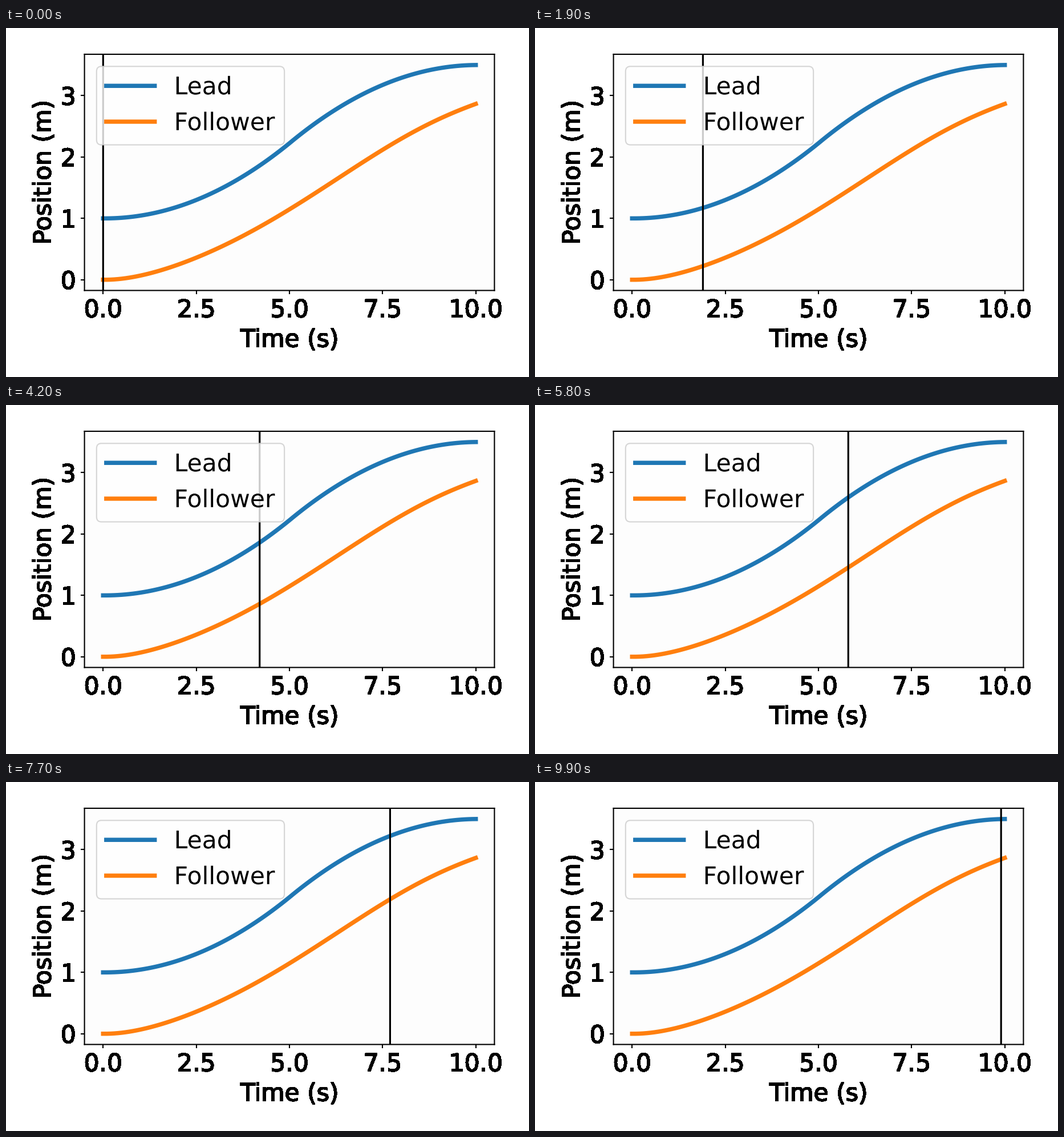
Recreate the animation shown at these times as a matplotlib script. Size 917 px wide and 611 px high, loop 10000 ms.

```python
import numpy as np
import matplotlib.pyplot as plt
from matplotlib import patheffects
from matplotlib.animation import FuncAnimation

W, H = 917, 611
DPI = W / 6
FRAMES, INTERVAL = 100, 100
LEFT, RIGHT, TOP, BOTTOM = 137.6, 856.4, 46.0, 459.5
DT = 0.1

plt.rcParams.update({
    "font.family": "DejaVu Sans",
    "font.size": 20,
    "path.snap": False,
    "text.hinting": "none",
    "axes.linewidth": 1,
    "xtick.major.width": 1,
    "ytick.major.width": 1,
})


def lead(t):
    """Stepwise integrated: 5 s of constant acceleration, then braking."""
    s = np.maximum(t - 5, 0)
    return 1 + 0.05 * t * (t - DT) - 0.1 * s * (s - DT)


def follower(t):
    """Smooth chase that starts at rest, fitted through a few waypoints."""
    tk = np.array([1, 1.9, 2.8, 4.2, 5, 5.8, 7.5, 9, 10])
    xk = np.array([0.061, 0.223, 0.437, 0.867, 1.146, 1.449, 2.123, 2.613, 2.867])
    fit = np.polyfit(tk, xk / (tk * (tk - DT)), 4, w=tk**2)
    return t * (t - DT) * np.polyval(fit, t)


fig = plt.figure(figsize=(6, (H + 1e-4) / DPI), dpi=DPI)
ax = fig.add_axes([LEFT / W, 1 - BOTTOM / H, (RIGHT - LEFT) / W, (BOTTOM - TOP) / H],
                  facecolor="#fdfdfd")

t = np.linspace(0, 10, 101)
ax.plot(t, lead(t), lw=3.5, color="#1f77b4", label="Lead")
ax.plot(t, follower(t), lw=3.5, color="#ff7f0e", label="Follower")
cursor = ax.axvline(0, color="black", lw=1.5)

ax.set(xlim=(-0.5, 10.5), ylim=(-0.175, 3.675),
       xticks=np.arange(0, 10.1, 2.5), yticks=range(4))
ax.set_xlabel("Time (s)", labelpad=5.3)
ax.set_ylabel("Position (m)")
legend = ax.legend(loc="upper left", labelspacing=0.52)

# Outlined text keeps subpixel positions
for text in legend.get_texts():
    text.set_path_effects([patheffects.Normal()])

# Margin text is slightly heavier, with hard edges
heavy = [patheffects.withStroke(linewidth=0.35, foreground="black")]
for text in [ax.xaxis.label, ax.yaxis.label, *ax.get_xticklabels(), *ax.get_yticklabels()]:
    text.set(antialiased=False, path_effects=heavy)


def update(i):
    x = i * INTERVAL / 1000
    cursor.set_xdata([x, x])
    return (cursor,)


anim = FuncAnimation(fig, update, frames=FRAMES, interval=INTERVAL,
                     repeat=True, repeat_delay=0, blit=False)
plt.show()
```
